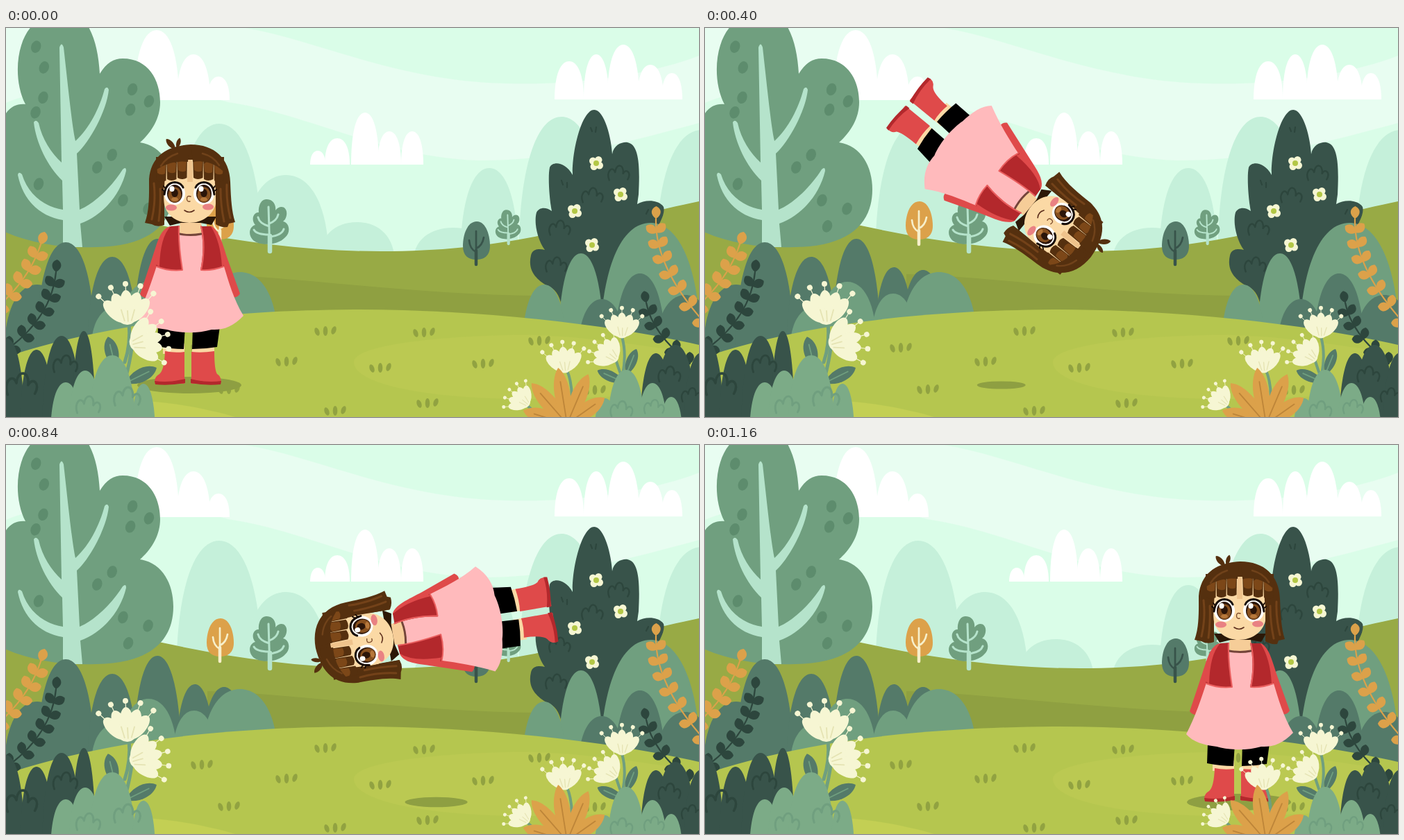
Write an HTML page that moves like this. It is 998 by 561 pixels and loops after 1640 ms.

```html
<!DOCTYPE html>
<html lang="en">
<head>
<meta charset="utf-8">
<title>Meadow somersault</title>
<style>
html, body { margin: 0; width: 100%; height: 100%; overflow: hidden; background: #dafde8; }
svg { display: block; width: 100vw; height: 100vh; }
</style>
</head>
<body>
<svg id="stage" viewBox="0 0 998 561" preserveAspectRatio="none"></svg>
<script>
const C = {
  leaf: '#709f7f', mid: '#547a69', dark: '#38534a', ink: '#2d463d', light: '#7cab87',
  mint: '#b5e3cb', far: '#c5f0da', cream: '#f6f6d3', orange: '#dca14a', tuft: '#91a241',
  hair: '#55300f', strand: '#7c4718', skin: '#fbd9a5', red: '#df4a4a', wine: '#b3282c', pink: '#ffbabc'
};

const shape = (d, fill) => `<path d="${d}" fill="${fill}"/>`;
const line = (d, color, w = 2) =>
  `<path d="${d}" fill="none" stroke="${color}" stroke-width="${w}" stroke-linecap="round" stroke-linejoin="round"/>`;
const oval = (x, y, rx, ry, fill, r = 0) =>
  `<ellipse cx="${x}" cy="${y}" rx="${rx}" ry="${ry}" fill="${fill}" transform="rotate(${r} ${x} ${y})"/>`;
const at = (x, y, r, s, body) => `<g transform="translate(${x} ${y}) rotate(${r}) scale(${s})">${body}</g>`;
const each = (list, fn) => list.map(a => fn(...a)).join('');
const repeat = (n, fn) => Array.from({ length: n }, (_, i) => fn(i)).join('');
const ring = (x, y, n, r, turn, fn) => repeat(n, i => {
  const a = turn + i * 2 * Math.PI / n;
  return fn(x + r * Math.cos(a), y + r * Math.sin(a));
});

// rounded lumps on a common base: [middle, half width, top]
const bush = (fill, base, ...lumps) => each(lumps, (x, w, top) => {
  const k = top + (base - top) * 0.32, v = w * 0.56;
  return shape(`M${x - w} ${base}C${x - w} ${k} ${x - v} ${top} ${x} ${top}S${x + w} ${k} ${x + w} ${base}Z`, fill);
});

function leaf(x, y, len, w, r, fill, vein) {
  const d = `M0 0C${w} ${-len * 0.3} ${w} ${-len * 0.8} 0 ${-len}C${-w} ${-len * 0.8} ${-w} ${-len * 0.3} 0 0Z`;
  return at(x, y, r, 1, shape(d, fill) + (vein ? line(`M0 -4V${-len * 0.75}`, vein, 1.8) : ''));
}

// leaf pairs along a quadratic curve
function sprig([x0, y0], [cx, cy], [x1, y1], n, len, fill) {
  return line(`M${x0} ${y0}Q${cx} ${cy} ${x1} ${y1}`, fill, 2.2) + repeat(n + 1, i => {
    const t = i / n, u = 1 - t;
    const x = u * u * x0 + 2 * u * t * cx + t * t * x1;
    const y = u * u * y0 + 2 * u * t * cy + t * t * y1;
    const a = Math.atan2(u * (cy - y0) + t * (y1 - cy), u * (cx - x0) + t * (x1 - cx)) * 180 / Math.PI + 90;
    const spread = i < n ? [-50, 50] : [0];
    return spread.map(b => leaf(x, y, len, len * 0.48, a + b, fill)).join('');
  });
}

// petals and stamens fan out from the base
function flower(x, y, s, r) {
  const fan = fn => repeat(5, i => at(0, 0, (i - 2) * 22, 1, fn(i - 2)));
  return at(x, y, r, s,
    fan(() => line('M0 -30V-56', C.cream, 1.2) + oval(0, -57, 4, 4, C.cream)) +
    fan(i => oval(0, -25, 10, 23 - Math.abs(i), C.cream)) +
    oval(0, -9, 13, 11, C.cream) +
    line('M-8 -20L-4 -4M1 -18V-3M11 -19L6 -4', '#e5e3b3', 1.8));
}

const loops = (x, y, s, color) =>
  at(x, y, 0, s, line('M-14 12C-19 -1 -9 -11 -5 0C-4 -14 9 -13 7 2C12 -7 20 1 14 11', color, 2.6));
const tuft = (x, y) => [-1, 0, 1].map(i => oval(x + 12 * i, y - i, 3.3, 7 - Math.abs(i), C.tuft, 20 * i)).join('');
const daisy = (x, y) =>
  ring(x, y, 4, 5.8, 0.6, (a, b) => oval(a, b, 5.2, 5.2, C.cream)) + oval(x, y, 4, 4, '#b3c745');
const spots = (x, y, n, r, turn) => ring(x, y, n, r, turn, (a, b) => oval(a, b, 7, 9, '#5d8c6d', 20));

function sky() {
  return `<rect width="998" height="561" fill="#dafde8"/>` +
    shape('M0 0H345C450 18 560 76 720 80C830 83 930 66 998 40V137C910 160 810 191 680 191C540 186 440 125 320 107C210 75 80 75 0 108Z', '#e8fdf1') +
    bush('#fff', 104, [217, 32, 3], [270, 24, 38], [306, 16, 70]) +
    bush('#fff', 197, [449, 11, 177], [477, 18, 159], [517, 20, 122], [552, 17, 149], [585, 16, 149]) +
    bush('#fff', 103, [811, 21, 48], [850, 18, 38], [889, 23, 24], [928, 19, 53], [959, 15, 65]) +
    bush(C.far, 340, [307, 62, 138], [403, 62, 212], [505, 55, 280], [644, 58, 288], [696, 42, 202], [800, 62, 128], [1002, 66, 147]);
}

// small trees grow up from their foot
const eggTree = (x, y, crown, wood) => at(x, y, 0, 1,
  shape('M1 -64C15 -64 20 -42 20 -29C20 -14 11 -9 0 -9C-12 -9 -19 -15 -19 -29C-19 -44 -13 -64 1 -64Z', crown) +
  line('M0 -2V-50M0 -20Q-9 -24 -10 -37M0 -25Q9 -29 11 -41', wood, 2.7) + line('M0 -2V-22', wood, 4.5));
const lumpTree = (x, y, s) => at(x, y, 0, s,
  shape('M-4 -78C7 -78 10 -68 9 -62C16 -71 27 -67 25 -55C24 -49 21 -47 20 -46C30 -44 31 -29 23 -23C11 -10 -17 -11 -24 -20C-31 -28 -28 -39 -20 -41C-27 -49 -22 -60 -15 -59C-16 -68 -12 -78 -4 -78Z', C.leaf) +
  line('M1 -3L-1 -67M0 -39Q-14 -43 -16 -52M0 -27Q-18 -27 -22 -34M0 -43Q11 -47 13 -56M1 -24Q18 -26 21 -35', C.mint, 3) +
  line('M1 -3V-25', C.mint, 6.5));

function bigTree() {
  return shape('M-10 160C-8 120 10 108 28 110C15 85 14 50 22 25C28 5 40 -10 60 -20H105C125 0 133 30 135 66C145 50 155 44 168 44C205 44 222 75 222 107C222 130 210 150 193 165C225 170 241 200 241 233C241 280 210 315 130 316C80 318 30 310 -10 290Z', C.leaf) +
    spots(189, 104, 3, 17, 0.1) + spots(183, 265, 3, 22, -0.2) + spots(49, 42, 2, 16, 1.2) +
    spots(48, 111, 2, 12, -1.1) + spots(142, 192, 2, 14, -0.7) + spots(47, 225, 1, 0, 0) +
    shape('M77 28Q80 19 83 28C90 90 95 140 100 163C120 145 135 115 142 88Q146 83 148 89C145 120 120 165 102 181L106 262C130 252 155 225 168 204Q173 199 173 206C165 240 140 270 107 282L110 316H82V277C50 272 25 250 17 212Q18 206 23 211C32 240 55 258 82 262L81 220C60 200 43 165 40 136Q43 131 47 137C52 160 65 180 80 194Z', C.mint);
}

function darkTree() {
  return shape('M847 118C862 118 872 160 873 182C875 168 888 164 895 165C912 168 913 200 911 240L909 254C920 247 940 247 947 258C950 268 940 285 930 300L880 400H800C797 385 790 375 780 372C758 360 752 345 756 328C758 318 768 318 776 320C765 305 760 280 764 266C768 258 778 258 786 264C783 250 780 215 783 201C787 192 805 192 816 212C815 175 830 118 847 118Z', C.dark) +
    each([[882, 208], [844, 240], [797, 287], [792, 340]], (x, y) => loops(x, y, 0.95, C.ink)) +
    line('M842 144L844 149M850 143L849 150M800 220L802 226M808 223L808 230M925 262L922 268', C.ink, 2.2) +
    daisy(850, 195) + daisy(885, 240) + daisy(819, 264) + daisy(844, 313);
}

function ground() {
  const tufts = [[460, 437], [602, 439], [768, 451], [404, 481], [539, 490], [687, 484], [282, 461], [321, 521], [474, 552], [607, 541], [848, 522]];
  return shape('M0 270C60 275 150 275 220 284C330 308 430 322 540 322C700 322 790 295 998 250V470H0Z', '#98aa45') +
    shape('M290 355C400 357 600 386 770 386V430H290Z', '#8fa041') +
    eggTree(308, 314, C.orange, '#f7efca') + eggTree(677, 343, C.mid, C.dark) +
    lumpTree(379, 325, 1) + lumpTree(723, 313, 0.65) + bigTree() + darkTree() +
    bush(C.mid, 475, [45, 48, 370], [86, 42, 309], [153, 36, 330], [218, 35, 304], [272, 28, 345], [314, 32, 349]) +
    bush(C.leaf, 460, [165, 42, 400], [205, 42, 366], [271, 32, 383], [337, 55, 352]) +
    bush(C.leaf, 475, [828, 33, 325], [928, 73, 281], [775, 32, 370]) +
    bush(C.mid, 480, [858, 35, 391], [913, 37, 354], [978, 44, 385]) +
    shape('M0 474C130 432 280 408 500 406C680 406 860 426 998 457V561H0Z', '#b5c64f') +
    shape('M998 470C900 455 800 440 720 443C600 446 500 460 501 482C502 515 610 534 740 535C850 535 940 528 998 520Z', '#bbc952') +
    shape('M200 538C250 541 300 552 330 561H200Z', '#c3cf54') + each(tufts, tuft);
}

function front() {
  return sprig([-14, 404], [34, 362], [50, 312], 5, 19, C.orange) +
    sprig([4, 462], [66, 415], [72, 352], 6, 18, C.ink) +
    sprig([1006, 425], [934, 345], [936, 275], 7, 18, C.orange) +
    sprig([985, 484], [930, 440], [922, 396], 5, 17, C.ink) +
    bush(C.dark, 590, [0, 27, 447], [44, 24, 464], [80, 28, 444], [112, 17, 437]) +
    loops(22, 512, 1.4, C.ink) + loops(85, 483, 1.1, C.ink) +
    bush(C.dark, 590, [936, 23, 469], [964, 30, 457], [1002, 26, 468]) +
    loops(955, 498, 1, C.ink) + loops(987, 528, 0.9, C.ink) +
    line('M177 425Q180 455 171 482M182 455Q178 485 172 505', C.leaf, 5) +
    leaf(158, 490, 46, 13, -14, C.mid, C.leaf) + leaf(172, 512, 50, 13, 64, C.mid, C.leaf) +
    line('M887 445Q894 470 888 500M878 478L884 496M808 494Q817 515 814 548M750 544L770 561', C.leaf, 4) +
    leaf(890, 511, 42, 10, -66, C.mid, C.leaf) + leaf(893, 500, 40, 10, 22, C.mid, C.leaf) +
    bush(C.light, 590, [86, 22, 511], [114, 24, 494], [153, 34, 472], [198, 17, 513]) +
    loops(118, 542, 1.1, C.leaf) + loops(174, 530, 1.2, C.leaf) +
    bush(C.light, 590, [863, 16, 534], [893, 27, 493], [931, 21, 512], [958, 16, 532]) +
    loops(886, 548, 1, C.leaf) + loops(933, 545, 0.9, C.leaf) +
    flower(175, 426, 1, -3) + flower(180, 456, 0.96, 75) + flower(887, 446, 0.74, 0) +
    flower(879, 479, 0.72, -50) + flower(805, 496, 0.76, -5) + flower(752, 544, 0.62, -50) +
    [-2, 2, -1, 1, 0].map(i => leaf(808, 571, 82 - 4 * i * i, 15, 32 * i - 9, C.orange, '#bd8539')).join('');
}

function eye(x, side) {
  return oval(x, 239, 15, 16, '#fff') + oval(x, 239, 11, 13, '#2b1509') + oval(x, 240.5, 9.5, 11, '#87501f') +
    oval(x, 238, 4.8, 6, '#2b1509') + oval(x, 247, 5, 3, '#b6783b') + oval(x - 4, 232, 3.6, 4, '#fff') +
    line(`M${x + side * 15} 240Q${x + side * 13} 223 ${x} 222.5Q${x - side * 9} 223 ${x - side * 12} 230`, '#160b06', 3) +
    line(`M${x + side * 14} 236L${x + side * 18} 233M${x + side * 13} 232L${x + side * 16} 228`, '#160b06', 1.8);
}

// three locks on each side of the parting, dark with a lit band
function fringe() {
  return repeat(6, i => {
    const x = 216 + i * 15 + (i > 2 ? 8 : 0), low = [2, 0, -2][i < 3 ? i : 5 - i];
    return shape(`M${x} 186H${x + 15}L${x + 14.500} ${218 + low}Q${x + 7} ${222 + low} ${x + 1} ${218 + low}Z`, C.hair) +
      shape(`M${x + 1} ${196 + low}Q${x + 7} ${190 + low} ${x + 14} ${195 + low}L${x + 13} ${208 + low}Q${x + 7} ${211 + low} ${x + 2} ${207 + low}Z`, C.strand);
  });
}

function legs() {
  return shape('M226 455H257V470H226ZM268 455H300V470H268Z', C.skin) +
    shape('M219 430H258L256 463Q238 463 218 459ZM269 430H308L304 460Q286 463 268 463Z', '#000') +
    shape('M229 466Q243 469 257 467V513H215Q212 504 221 499Q228 493 229 466ZM267 467Q282 469 300 466Q300 493 304 499Q311 503 309 513H267Z', C.red) +
    shape('M214 509Q236 512 258 506V512Q236 516 215 514ZM266 506Q288 512 310 509L309 514Q288 516 266 512Z', C.wine);
}

function outfit() {
  return shape('M238 286C222 288 218 310 211 330L193 384Q197 390 204 389L240 345ZM294 286C307 289 312 312 319 333L337 383Q333 390 326 388L290 345Z', C.red) +
    shape('M250 296H282L314 344C320 364 328 392 342 415C327 431 312 436 296 435C276 441 248 440 232 435C214 433 197 428 188 417C201 392 210 365 217 343Z', C.pink) +
    shape('M251 278H281L282 298Q266 301 249 297Z', '#f6cd98') + line('M250 297Q266 300 281 297', '#74453a', 3) +
    shape('M237 286L250 285C248 310 251 330 254 349Q234 351 216 343C222 322 224 294 237 286ZM280 286L295 286C307 292 308 322 314 343Q298 350 280 349C284 330 285 307 280 286Z', C.wine) +
    line('M249 286C248 310 251 330 254 349Q234 351 217 344M281 286C286 307 285 330 281 349Q298 350 313 344', '#ea5f5f', 2) +
    shape('M237 286C222 288 219 320 214 340L221 344Q222 302 237 286ZM295 286C307 289 310 318 317 339L311 344Q309 308 295 286Z', C.red);
}

function head() {
  return shape('M228 272H303L296 284L280 281H252L236 285Z', '#2b1807') +
    shape('M266 168C300 168 322 188 323 222C324 248 325 265 330 280L321 282L319 287Q309 288 302 283V215H228V284Q218 288 210 283L200 281C207 262 206 238 206 218C209 184 232 170 266 168Z', C.hair) +
    leaf(244, 175, 20, 5, -42, C.hair) + leaf(246, 174, 16, 4, 16, C.hair) +
    shape('M226 190H303V247C302 267 285 281 264 281C244 281 228 268 227 248Z', C.skin) +
    shape('M262 192Q265 188 268 192L269 222H261Z', '#efc38c') +
    shape('M225 200Q231 215 227 233L228 284L217 285V205ZM303 200Q299 216 302 233V282L312 285V205Z', C.hair) +
    line('M213 224Q216 250 210 276M222 232Q223 255 220 278M309 232Q309 256 314 279M318 226Q317 250 323 274', '#734219', 3) +
    eye(243, -1) + eye(285, 1) +
    oval(238, 259, 8, 4.5, '#e98183') + oval(291, 258, 8, 4.5, '#e98183') +
    line('M266 243Q260 241 260.500 247Q261 251 265 250', '#7d4c2c', 1.4) + line('M257 263Q264 268 271 263', '#5b2d1b', 1.6) +
    fringe() +
    shape('M213 202Q230 172 264 174L262 193Q238 190 217 204ZM267 174Q301 173 316 202L312 206Q294 189 269 193Z', C.hair) +
    line('M247 181Q231 186 223 199M283 181Q299 185 307 198', '#70421a', 2.4);
}

document.getElementById('stage').innerHTML = sky() + ground() +
  `<ellipse id="shade" cy="515" fill="#8e9f42"/><g id="girl">${legs() + outfit() + head()}</g>` + front();
const girl = document.getElementById('girl');
const shade = document.getElementById('shade');

const LOOP = 1640, STEP = 40, TOP = 560, END = 1160;
const START_X = 264, START_Y = 341, TRAVEL = 505, RISE = 171;

function draw() {
  const now = performance.now() % LOOP;
  const t = Math.min(END, Math.floor(now / STEP) * STEP);
  const u = t / END;
  const up = t < TOP, v = up ? t / TOP : (t - TOP) / (END - TOP);
  const x = START_X + TRAVEL * u * (0.87 + 0.13 * u);
  const y = START_Y - RISE * (up ? v : 1 - v * (1.35 - 0.35 * v));
  const turn = 360 * u + 8 * (1 - u) * Math.sin(1.5 * Math.PI * u);
  const w = 150 - 112 * (up ? v : 1 - v);
  girl.setAttribute('transform', `translate(${x} ${y}) rotate(${turn}) translate(${-START_X} ${-START_Y})`);
  shade.setAttribute('cx', START_X + TRAVEL * u * (0.9 + 0.1 * u));
  shade.setAttribute('rx', w / 2);
  shade.setAttribute('ry', w * 0.08);
  requestAnimationFrame(draw);
}
draw();
</script>
</body>
</html>
```
